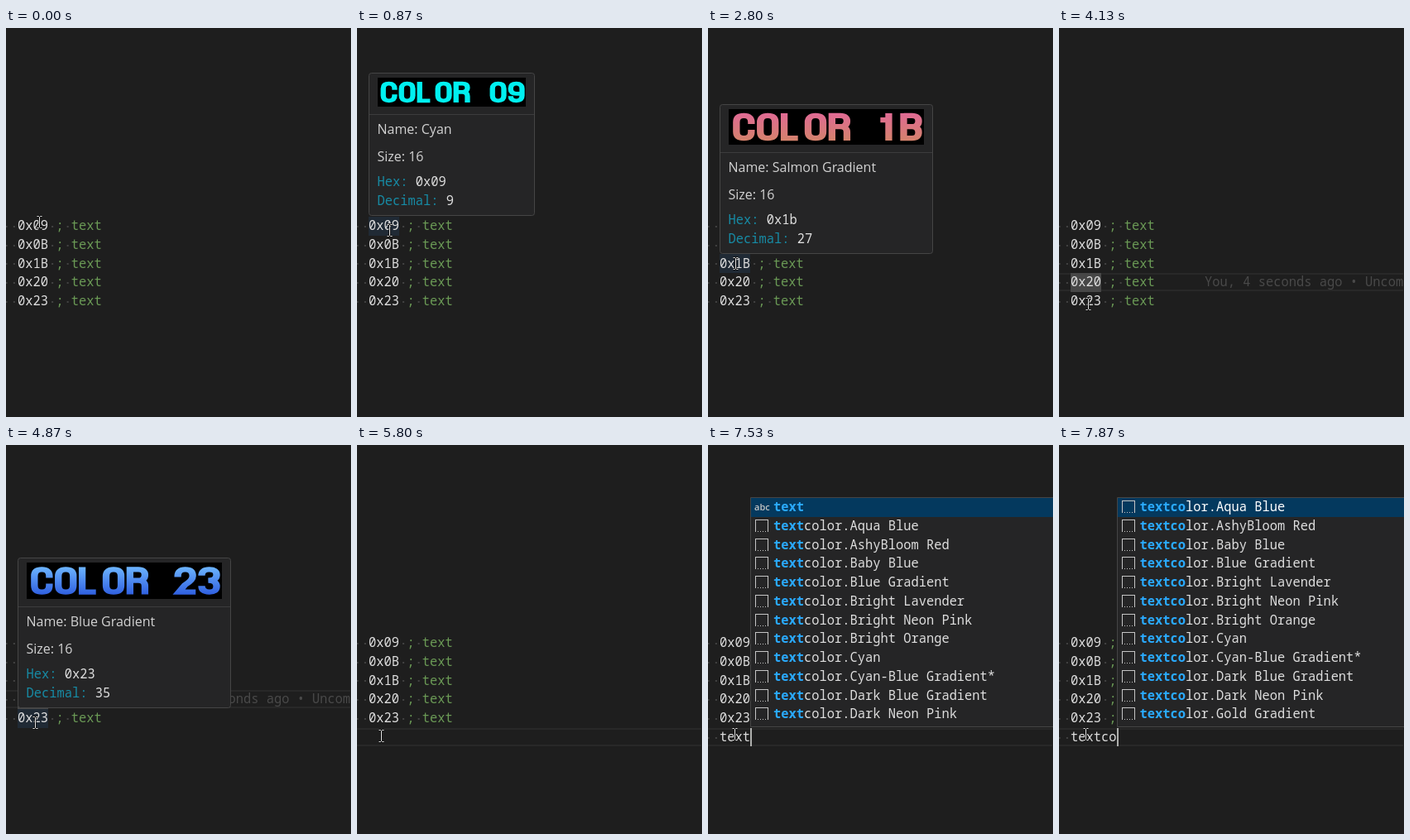
Animation of 417x470 px, one loop 8000 ms. Source, as an HTML page with a canvas:

```html
<!DOCTYPE html>
<html lang="en">
<head>
<meta charset="utf-8">
<title>Editor hover and completion</title>
<style>
html, body { margin: 0; width: 100%; height: 100%; overflow: hidden; background: #1e1e1e; }
canvas { display: block; }
</style>
</head>
<body>
<canvas id="stage" width="417" height="470"></canvas>
<script>
const ctx = document.getElementById('stage').getContext('2d');
const LOOP = 8000, CHAR = 9.25, LINE = 22.75, LEFT = 14, TOP = 227.8;
const MONO = '15.42px "Noto Sans Mono", monospace';
const SANS = '16px "Open Sans", sans-serif';
const INK = '#dedede';

const codes = ['0x09', '0x0B', '0x1B', '0x20', '0x23'];
const words = ['t_SameCharSlots', 't_sameCharSlots', 'table', 'tableStart', 'taken', 'target',
  'targeting', 'taunt', 'taunting', 'team', 'teams', 'temp', 'test', 'text',
  ...['Aqua Blue', 'AshyBloom Red', 'Baby Blue', 'Blue Gradient', 'Bright Lavender',
    'Bright Neon Pink', 'Bright Orange', 'Cyan', 'Cyan-Blue Gradient*', 'Dark Blue Gradient',
    'Dark Neon Pink', 'Gold Gradient'].map(name => 'textcolor.' + name)];
const keyTimes = [6930, 7070, 7270, 7530, 7730, 7870];

const tips = [
  { row: 0, from: 330, to: 1330, fade: 70, w: 179, h: 35, scale: 2.75, name: 'Cyan', colors: ['#00f0f0', '#00f0f0'] },
  { row: 1, from: 1330, to: 2800, fade: 0, w: 245, h: 54, scale: 3.61, name: 'Gold Gradient', colors: ['#ffdc00', '#ffb400'] },
  { row: 2, from: 2800, to: 3270, fade: 0, w: 236, h: 43, scale: 3.61, name: 'Salmon Gradient', colors: ['#e06a94', '#d4826c'] },
  { row: 4, from: 4400, to: 5330, fade: 130, w: 236, h: 44, scale: 3.61, name: 'Blue Gradient', colors: ['#6cb4ff', '#3060e0'] }
];

// Mouse path: time, x, y
const path = [[0, 40, 234], [810, 40, 234], [1000, 37, 265.5], [1400, 37, 265.5], [1600, 37, 256],
  [1870, 37, 256], [2130, 37, 261], [2270, 37, 261], [2470, 33, 283.5], [3070, 33, 283.5],
  [3400, 34, 307], [3740, 34, 307], [3950, 36, 352], [4130, 35, 333], [4340, 35, 333],
  [4530, 35, 335], [5200, 35, 335], [5530, 29, 351], [5930, 29, 351], [6070, 32, 349], [LOOP, 32, 349]];

// Block letters as thick strokes in a 7.4 x 12.2 box, squeezed vertically when drawn
const SQUEEZE = .75;
const ring = 'M1.2 4Q1.2 1.1 3.7 1.1T6.2 4V8.2Q6.2 11.1 3.7 11.1T1.2 8.2Z';
const glyphs = {
  O: ring, 0: ring,
  C: 'M6.2 4.8V4Q6.2 1.1 3.7 1.1T1.2 4V8.2Q1.2 11.1 3.7 11.1T6.2 8.2V7.4',
  L: 'M1.2 0V11.1H5.8',
  R: 'M1.2 12.2V1.1H4Q6.2 1.1 6.2 3.5T4 6H1.2M4 6Q6.2 6 6.2 8.4V12.2',
  B: 'M1.2 0V11.1H4Q6.2 11.1 6.2 8.6T4 6H1.2M1.2 1.1H4Q6.2 1.1 6.2 3.5T4 6',
  1: 'M1.4 3H4M4.2 0V12.2',
  2: 'M1.2 4.4V4Q1.2 1.1 3.7 1.1T6.2 4Q6.2 6 3.6 8L1.6 11.1H7.2',
  3: 'M1.2 3.8Q1.2 1.1 3.7 1.1T6.2 3.5T3.4 6Q6.2 6 6.2 8.6T3.7 11.1T1.2 8.4',
  9: 'M6.2 4Q6.2 1.1 3.7 1.1T1.2 4T3.7 7H6.2M6.2 4V8.2Q6.2 11.1 3.7 11.1T1.2 8.4'
};

const within = (t, a, b) => t >= a && t < b;
const rowTop = row => TOP + row * LINE;
const baseline = row => Math.round(rowTop(row) + 16.2);

function text(str, x, y, color, font = '500 ' + MONO) {
  ctx.font = font;
  ctx.fillStyle = color;
  ctx.fillText(str, x, y);
}

function box(x, y, w, h, color) {
  ctx.fillStyle = color;
  ctx.fillRect(x, y, w, h);
}

function panel(x, y, w, h, radius) {
  ctx.beginPath();
  ctx.roundRect(x + .5, y + .5, w - 1, h - 1, radius);
  ctx.fillStyle = '#252526';
  ctx.fill();
  ctx.strokeStyle = '#454545';
  ctx.lineWidth = 1;
  ctx.stroke();
}

function dot(col, row) {
  box(LEFT + (col + .5) * CHAR - .5, Math.round(rowTop(row) + 11), 2, 2, '#424242');
}

function caret(x, row) {
  box(x, Math.round(rowTop(row)), 2, 22, '#aeafad');
}

function wordBox(row, color) {
  box(LEFT, Math.round(rowTop(row)), 4 * CHAR, 23, color);
}

function banner(tip, x, y) {
  const height = 12.2 * SQUEEZE * tip.scale;
  box(x, y, tip.w, tip.h, '#000');
  ctx.save();
  ctx.translate(x + (tip.w - 62.6 * tip.scale) / 2, y + (tip.h - height) / 2);
  ctx.scale(tip.scale, tip.scale * SQUEEZE);
  const paint = ctx.createLinearGradient(0, 0, 0, 12.2);
  tip.colors.forEach((color, i) => paint.addColorStop(i, color));
  ctx.strokeStyle = paint;
  ctx.lineWidth = 2.3;
  for (const ch of 'COLOR ' + codes[tip.row].slice(2)) {
    if (glyphs[ch]) ctx.stroke(new Path2D(glyphs[ch]));
    ctx.translate(8, 0);
  }
  ctx.restore();
}

function tooltip(tip, t) {
  const code = codes[tip.row], bottom = Math.round(rowTop(tip.row) - .5);
  const w = tip.w + 22, h = tip.h + 138, top = bottom - h;
  ctx.globalAlpha = tip.fade ? Math.min(1, .4 + .6 * (t - tip.from) / tip.fade) : 1;
  panel(LEFT, top, w, h, 3);
  banner(tip, 25, top + 6);
  box(LEFT + 1, bottom - 123, w - 2, 1, '#3c3c3d');
  text('Name: ' + tip.name, 24.5, bottom - 99, '#d2d2d2', SANS);
  text('Size: 16', 24.5, bottom - 66, '#d2d2d2', SANS);
  const field = (label, value, y) => {
    text(label, 24.5, y, '#178ba5');
    text(value, 24.5 + (label.length + 1) * CHAR, y, INK);
  };
  field('Hex:', code.toLowerCase(), bottom - 36);
  field('Decimal:', String(Number(code)), bottom - 13);
  ctx.globalAlpha = 1;
}

function snippetIcon(x, y) {
  const color = '#c5c5c5';
  box(x, y, 16, 1, color);
  box(x, y, 1, 15, color);
  box(x + 15, y, 1, 15, color);
  for (let i = 0; i < 16; i += 3) box(x + i, y + 14, 1, 1, color);
}

function suggestions(typed) {
  const left = LEFT + typed.length * CHAR, x = Math.round(left), y = 63;
  panel(x, y, 450, 278, 0);
  box(x + 1, y + 1, 450, 23, '#04395e');
  words.filter(word => word.startsWith(typed)).slice(0, 12).forEach((word, i) => {
    const base = Math.round(80 + i * LINE);
    if (word.includes('.')) snippetIcon(x + 6, base - 13);
    else text('abc', x + 5, base - 1, '#c5c5c5', '600 11px "Open Sans", sans-serif');
    text(typed, left + 28, base, '#2aaaff', 'bold ' + MONO);
    text(word.slice(typed.length), left + 28 + typed.length * CHAR, base, i ? INK : '#ffffff');
  });
}

function mouse(t) {
  const i = path.findIndex(p => p[0] > t);
  const [t0, x0, y0] = path[i - 1], [t1, x1, y1] = path[i];
  const k = (t - t0) / (t1 - t0);
  ctx.save();
  ctx.translate(Math.round(x0 + (x1 - x0) * k) + .5, Math.round(y0 + (y1 - y0) * k) + .5);
  const beam = new Path2D('M-3 -7H-1L0 -6L1 -7H3M0 -6V6M-3 7H-1L0 6L1 7H3');
  for (const [color, width] of [['#111', 2.5], ['#e4e4e4', 1]]) {
    ctx.strokeStyle = color;
    ctx.lineWidth = width;
    ctx.stroke(beam);
  }
  ctx.restore();
}

function draw(t) {
  box(0, 0, 417, 470, '#1e1e1e');
  const activeRow = t < 3600 ? -1 : t < 5600 ? 3 : 5;
  const tip = tips.find(item => within(t, item.from, item.to));
  const typed = 'textco'.slice(0, keyTimes.filter(k => t >= k).length);

  if (activeRow > 0) {
    const y = Math.round(rowTop(activeRow));
    box(0, y, 416, 2, '#282828');
    box(0, y + 20, 416, 2, '#282828');
  }
  if (activeRow === 3) wordBox(3, '#474747');
  if (tip) wordBox(tip.row, '#202a35');

  codes.forEach((code, row) => {
    [-2, -1, 4, 6].forEach(col => dot(col, row));
    text(code, LEFT, baseline(row), INK);
    text(';', LEFT + 5 * CHAR, baseline(row), '#6a9955');
    text('text', LEFT + 7 * CHAR, baseline(row), '#6a9955');
  });
  if (t >= 6330) dot(-2, 5);
  if (t >= 6470) dot(-1, 5);
  text(typed, LEFT, baseline(5), INK);

  if (activeRow === 3) text('You, 4 seconds ago • Uncommitted changes', 176, baseline(3), '#494949');
  if (within(t, 5950, 6270)) text('You, seconds ago • Uncommitted changes', 37, baseline(5), '#494949');

  if (within(t, 3600, 4100) || within(t, 4870, 5330)) caret(33, 3);
  if (tip) tooltip(tip, t);
  if (typed) suggestions(typed);
  if (t >= 6330) caret(Math.round(LEFT + (t < 6470 ? -1 : typed.length) * CHAR), 5);
  mouse(t);
}

const start = performance.now();
function tick() {
  draw((performance.now() - start) % LOOP);
  requestAnimationFrame(tick);
}
tick();
</script>
</body>
</html>
```
